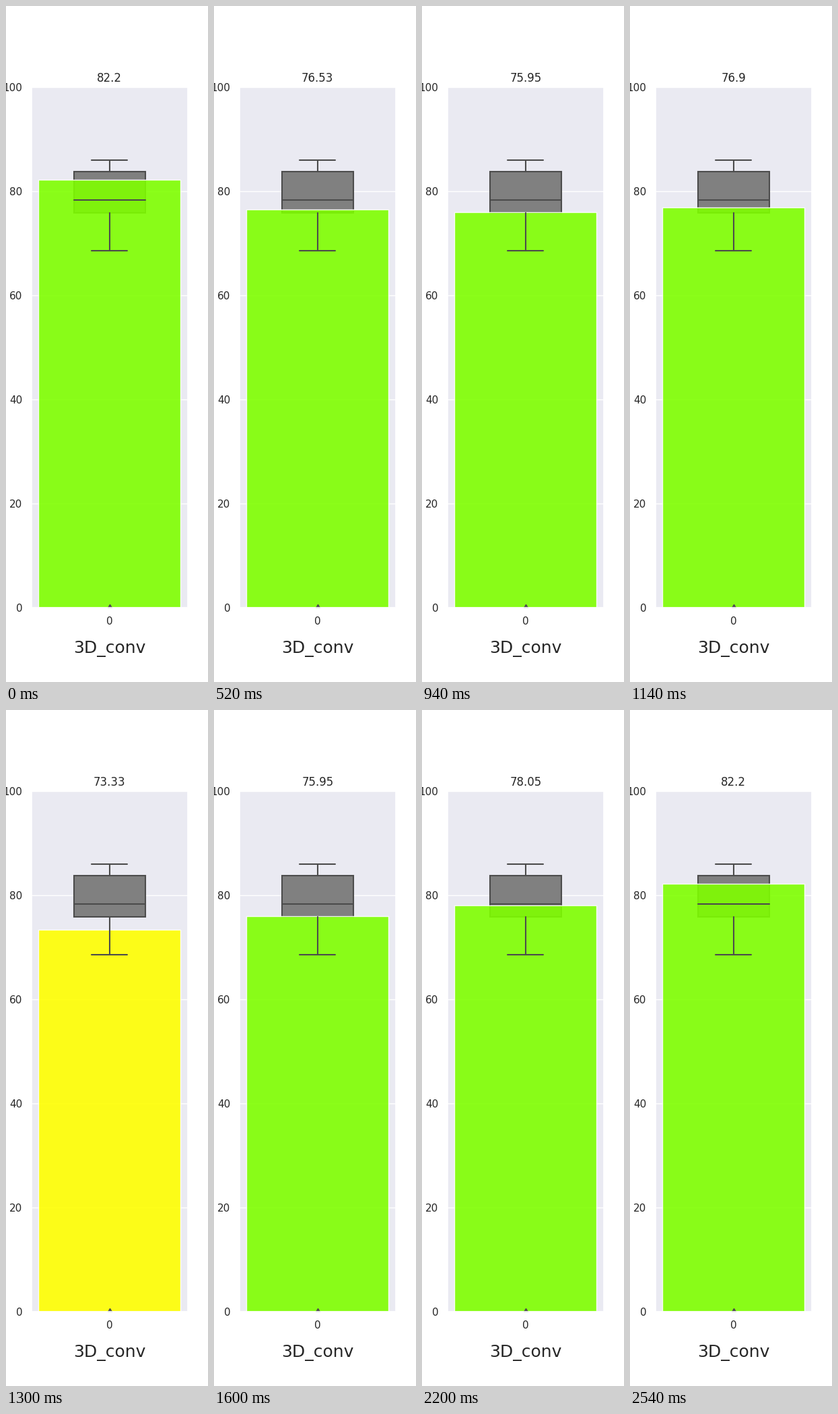
These frames come from a looping animation (300 by 1000 pixels, 2.56 s). A matplotlib script:

```python
import matplotlib.pyplot as plt
from matplotlib.animation import FuncAnimation
from matplotlib.patches import Rectangle

TICK_MS = 20
INK = "#262626"
LINE = "#4c4c4c"
GOOD, FAIR = "chartreuse", "yellow"
GOOD_FROM = 75

SCORES = [
    82.2, 84.6, 78.4, 83.9, 74.6, 79.3, 84.35, 77.2,
    85.1, 78.05, 83.6, 76.1, 81.4, 84.9, 76.53, 78.2,
    73.55, 79.8, 84.2, 68.57, 77.6, 83.1, 85.97, 75.95,
    80.7, 77.9, 84.05, 74.2, 78.9, 76.9, 73.33, 77.4,
]
LOW, Q1, MEDIAN, Q3, HIGH = 68.57, 75.86, 78.3, 83.77, 85.97

# Every fourth score rests for five ticks; the run then plays backwards.
forward = [s for i, s in enumerate(SCORES) for _ in range(5 if i % 4 == 2 else 1)]
timeline = forward + forward[::-1]

plt.rcParams.update({"font.family": "DejaVu Sans", "text.color": INK})
fig = plt.figure(figsize=(3, 10), dpi=100, facecolor="white")
ax = fig.add_axes([0.125, 0.11, 0.775, 0.77], facecolor="#eaeaf2")
ax.set(xlim=(-0.44, 0.44), ylim=(0, 100), xticks=[0], yticks=range(0, 101, 20))
ax.set_axisbelow(True)
ax.grid(axis="y", color="white", linewidth=1)
ax.tick_params(length=0, pad=9.5, labelsize=11, labelcolor=INK)
ax.set_xlabel("3D_conv", fontsize=18, color=INK, labelpad=15)
for spine in ax.spines.values():
    spine.set(color="white", linewidth=1.25)


def stroke(xs, ys):
    ax.plot(xs, ys, color=LINE, linewidth=1.5, solid_capstyle="round")


def draw_box():
    ax.add_patch(Rectangle((-0.2, Q1), 0.4, Q3 - Q1, facecolor="#808080",
                           edgecolor=LINE, linewidth=1.5))
    for start, end in ((Q1, LOW), (Q3, HIGH)):
        stroke([0, 0], [start, end])
        stroke([-0.1, 0.1], [end, end])
    stroke([-0.2, 0.2], [MEDIAN, MEDIAN])
    ax.plot([0], [0], marker="d", markersize=5, color=LINE)


draw_box()
bar = ax.add_patch(Rectangle((-0.4, 0), 0.8, SCORES[0], facecolor=GOOD,
                             edgecolor="white", linewidth=1, alpha=0.9))
title = ax.set_title("", fontsize=12, pad=6)


def update(tick):
    score = timeline[tick]
    bar.set_height(score)
    bar.set_facecolor(GOOD if score >= GOOD_FROM else FAIR)
    title.set_text(str(score))
    return bar, title


anim = FuncAnimation(fig, update, frames=len(timeline), interval=TICK_MS,
                     repeat=True, repeat_delay=0, blit=False)
plt.show()
```
